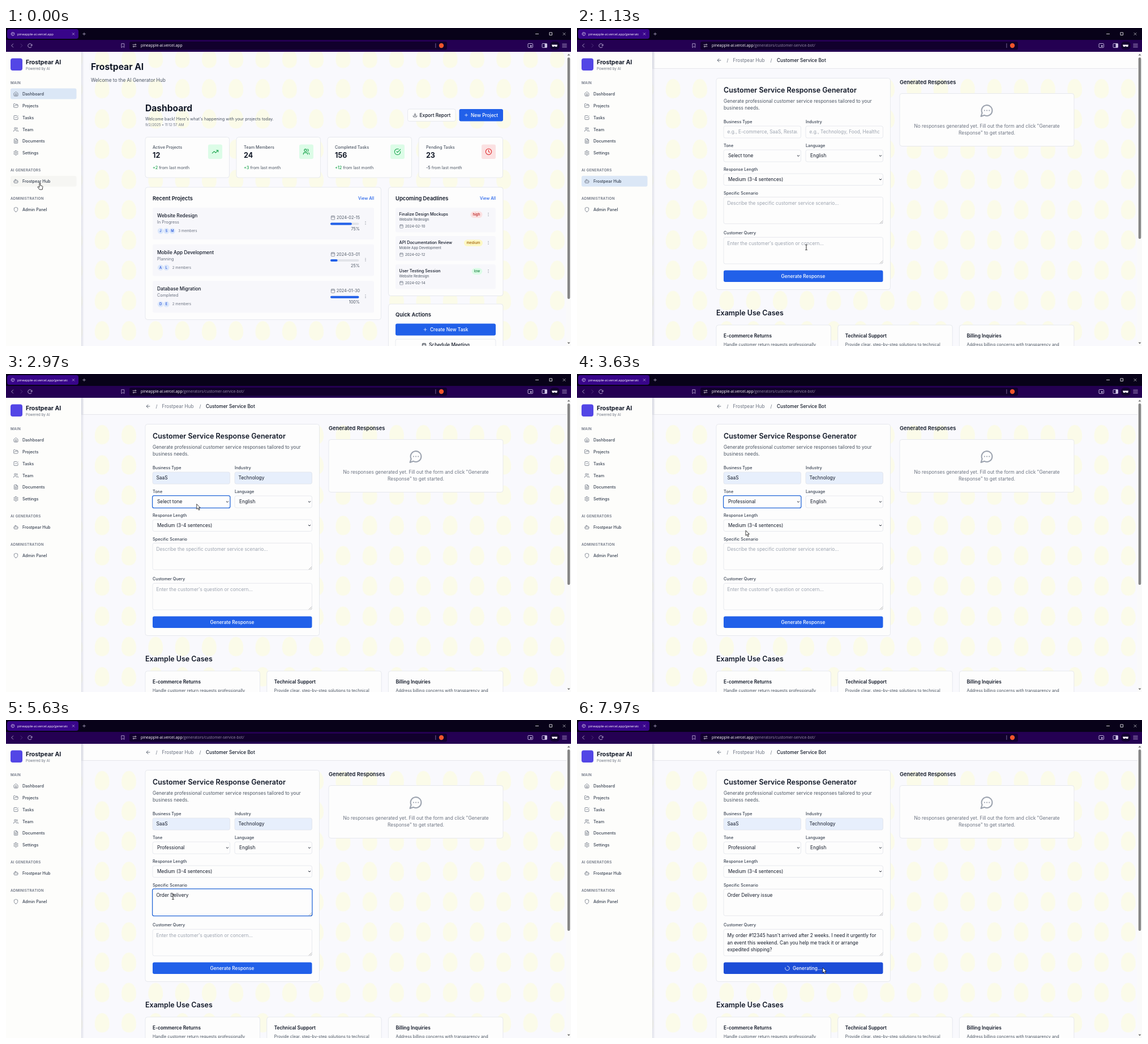
Animation, 998 px wide and 561 px high, one loop 8 s. Source, as an HTML page:

```html
<!DOCTYPE html>
<html lang="en">
<head>
<meta charset="utf-8">
<title>Response generator demo</title>
<style>
  html, body { margin: 0; width: 100%; height: 100%; overflow: hidden; background: #f9f9fd; }
  svg { display: block; width: 998px; height: 561px; font-family: Inter, "Open Sans", sans-serif; }
  text { white-space: pre; }
</style>
</head>
<body>
<svg id="stage" viewBox="0 0 998 561"></svg>
<script>
const DURATION = 8000;
const INK = '#111827', TEXT = '#4b5563', MUTED = '#6b7280', HINT = '#9ca3af';
const BLUE = '#2160e9', LINE = '#dfe1e8', CARD = '#fdfdfd';
const BASE = 8.32, SMALL = 7.28, TINY = 6.24;

const ICONS = {
  home: 'M3 10l9-7 9 7v10a2 2 0 0 1-2 2H5a2 2 0 0 1-2-2zM9 22V12h6v10',
  folder: 'M6 14l1.5-3A2 2 0 0 1 9.2 10H20a2 2 0 0 1 2 2.5l-1.5 6A2 2 0 0 1 18.5 20H4a2 2 0 0 1-2-2V5a2 2 0 0 1 2-2h4l3 3h7a2 2 0 0 1 2 2v2',
  task: 'M21 11v8a2 2 0 0 1-2 2H5a2 2 0 0 1-2-2V5a2 2 0 0 1 2-2h11M9 11l3 3L22 4',
  users: 'M16 21v-2a4 4 0 0 0-4-4H6a4 4 0 0 0-4 4v2M13 7a4 4 0 1 1-8 0a4 4 0 1 1 8 0M22 21v-2a4 4 0 0 0-3-3.9M16 3.1a4 4 0 0 1 0 7.8',
  file: 'M14 2H6a2 2 0 0 0-2 2v16a2 2 0 0 0 2 2h12a2 2 0 0 0 2-2V8zM14 2v6h6M8 13h8M8 17h8M8 9h2',
  gear: 'M10 2h4l.6 3 2 1.1 2.9-1 2 3.5-2.3 2v2.8l2.3 2-2 3.5-2.9-1-2 1.1-.6 3h-4l-.6-3-2-1.1-2.9 1-2-3.5 2.3-2v-2.8l-2.3-2 2-3.5 2.9 1 2-1.1zM15 12a3 3 0 1 1-6 0a3 3 0 1 1 6 0',
  bot: 'M12 8V4H8M6 8h12a2 2 0 0 1 2 2v8a2 2 0 0 1-2 2H6a2 2 0 0 1-2-2v-8a2 2 0 0 1 2-2M2 14h2M20 14h2M15 13v2M9 13v2',
  shield: 'M12 22c5-2 8-5 8-9V5l-8-3-8 3v8c0 4 3 7 8 9z',
  download: 'M21 15v4a2 2 0 0 1-2 2H5a2 2 0 0 1-2-2v-4M7 10l5 5 5-5M12 15V3',
  plus: 'M5 12h14M12 5v14',
  trend: 'M22 7l-8.5 8.5-5-5L2 17M16 7h6v6',
  done: 'M22 11v1a10 10 0 1 1-6-9M9 11l3 3L22 4',
  clock: 'M22 12a10 10 0 1 1-20 0a10 10 0 1 1 20 0M12 6v6l4 2',
  calendar: 'M5 4h14a2 2 0 0 1 2 2v14a2 2 0 0 1-2 2H5a2 2 0 0 1-2-2V6a2 2 0 0 1 2-2M16 2v4M8 2v4M3 10h18',
  dots: 'M12 5v.1M12 12v.1M12 19v.1',
  chat: 'M7.9 20A9 9 0 1 0 4 16.1L2 22zM8 12h.1M12 12h.1M16 12h.1',
  back: 'M12 19l-7-7 7-7M19 12H5',
  next: 'M12 19l7-7-7-7M5 12h14',
  chevronLeft: 'M15 4l-8 8 8 8', chevronRight: 'M9 4l8 8-8 8', chevronDown: 'M5 8l7 7 7-7',
  reload: 'M20 7v5h-5M20 12a8.500 8.500 0 1 0-2 6',
  bookmark: 'M6 3h12v18l-6-5-6 5z',
  globe: 'M22 12a10 10 0 1 1-20 0a10 10 0 1 1 20 0M2 12h7l3 4v6M8 3l2 5h6l4-2',
  sliders: 'M3 7h9M20 7a3 3 0 1 1-6 0a3 3 0 1 1 6 0M12 17h9M10 17a3 3 0 1 1-6 0a3 3 0 1 1 6 0',
  close: 'M5 5l14 14M19 5L5 19',
  menu: 'M2 5h20M2 12h20M2 19h20',
  spinner: 'M21 12a9 9 0 1 1-6.2-8.600'
};

// Vertical positions of text and icons are given at their centre.
const rect = (x, y, w, h, fill, rx = 0, more = '') =>
  `<rect x="${x}" y="${y}" width="${w}" height="${h}" rx="${rx}" fill="${fill}" ${more}/>`;
const text = (x, y, str, size = BASE, color = INK, weight = 400, more = '') =>
  `<text x="${x}" y="${y + size * .36}" font-size="${size}" fill="${color}" font-weight="${weight}" ${more}>${str}</text>`;
const icon = (name, x, y, size = 9, color = MUTED, width = 2) =>
  `<path d="${ICONS[name]}" transform="translate(${x - size / 2} ${y - size / 2}) scale(${size / 24})" fill="none" stroke="${color}" stroke-width="${width}" stroke-linecap="round" stroke-linejoin="round"/>`;
const box = (x, y, w, h, rx = 4, fill = CARD, more = '') =>
  rect(x, y, w, h, fill, rx, `stroke="${LINE}" stroke-width=".7" ${more}`);
const circle = (x, y, r, fill) => `<circle cx="${x}" cy="${y}" r="${r}" fill="${fill}"/>`;
const END = 'text-anchor="end"', MID = 'text-anchor="middle"';

function backdrop() {
  return `<defs>
    <pattern id="dots" width="47.3" height="53.4" x="193.300" y="80" patternUnits="userSpaceOnUse">
      <path d="M23.700 10c8 0 13 9 13 19s-5 15-13 15-13-5-13-15 5-19 13-19z" fill="#fbfbe9"/></pattern>
    <linearGradient id="edge"><stop stop-color="#c9cbd8" stop-opacity=".55"/><stop offset="1" stop-color="#c9cbd8" stop-opacity="0"/></linearGradient>
    <clipPath id="tabClip"><rect x="18" width="91" height="21"/></clipPath>
    <clipPath id="bizClip"><rect x="263" y="173" width="126" height="21"/></clipPath>
    <clipPath id="indClip"><rect x="408" y="173" width="126.500" height="21"/></clipPath>
  </defs>` + rect(0, 0, 998, 561, '#f9f9fd') + rect(133, 42, 857, 519, 'url(#dots)');
}

function browser() {
  const pale = '#cfc5e6', ui = '"Open Sans", sans-serif';
  const font = `font-family='${ui}'`;
  return rect(0, 0, 998, 21, '#080219') + rect(2, 2, 126, 17, '#38058a', 4) + rect(0, 21, 998, 21, '#240052')
    + icon('globe', 12, 10.5, 7, '#ddd5ee')
    + `<g clip-path="url(#tabClip)">${text(20, 10.500, '', 5.900, '#fff', 400, `id="tabTitle" ${font}`)}</g>`
    + icon('close', 119, 10.500, 6, '#fff') + icon('plus', 138, 10.500, 8, pale)
    + icon('chevronLeft', 11.500, 31, 9, pale) + icon('chevronRight', 27, 31, 9, '#5d4587') + icon('reload', 42.500, 31, 10, pale)
    + icon('bookmark', 206.500, 31, 9, pale)
    + rect(218, 24, 561, 14.500, '#11002c', 3) + icon('sliders', 227, 31, 8, '#fff')
    + text(238, 31, 'pineapple-ai.vercel.app<tspan id="path" fill="#9a90ad"></tspan>', 6.800, '#fff', 400, font)
    + rect(758.500, 27, .8, 8, '#8d7cab') + circle(769, 31, 4.200, '#f0552c')
    + rect(935, 10, 6, .8, '#fff') + rect(960, 8, 4.500, 4.500, 'none', 0, 'stroke="#fff" stroke-width=".8"') + icon('close', 986, 10.500, 7, '#fff')
    + rect(922, 27.500, 8.500, 7, 'none', 1, `stroke="${pale}" stroke-width=".9"`) + rect(926, 30.500, 2.500, 2.500, pale)
    + rect(947, 27.500, 8.500, 7, 'none', 1, `stroke="${pale}" stroke-width=".9"`) + rect(951.500, 27.500, 4, 7, pale)
    + rect(961, 24, 17, 14, '#13002f', 6) + `<path d="M964 29.500h10l-.7 3.500h-3.300l-.8-2-.8 2h-3.300z" fill="#fff"/>`
    + icon('menu', 986.500, 31, 9, pale);
}

function sidebar() {
  const items = [['home', 'Dashboard', 116], ['folder', 'Projects', 137], ['task', 'Tasks', 158], ['users', 'Team', 179],
    ['file', 'Documents', 199.500], ['gear', 'Settings', 220.300], ['bot', 'Frostpear Hub', 270.300], ['shield', 'Admin Panel', 320.300]];
  const caps = [['MAIN', 96.300], ['AI GENERATORS', 250.300], ['ADMINISTRATION', 300.300]];
  return rect(133, 42, 5, 519, 'url(#edge)') + rect(0, 42, 132.500, 519, '#fdfdfb')
    + rect(8, 53.500, 21, 21.500, '#5346e6', 4)
    + text(35, 60, 'Frostpear AI', 10.400, INK, 700) + text(35, 71.300, 'Powered by AI', TINY, MUTED)
    + caps.map(([s, y]) => text(8, y, s, TINY, MUTED, 600, 'letter-spacing=".3"')).join('')
    + rect(8, 106.500, 116.500, 19, '#dbe7f6', 3, 'id="navHome"') + rect(8, 260.800, 116.500, 19, '#f6f6f3', 3, 'id="navHub"')
    + items.map(([i, s, y]) => icon(i, 17.500, y, 9.400) + text(29, y, s, SMALL, '#374151', 500)).join('');
}

function dashboard() {
  const stats = [['Active Projects', '12', '+2', 'trend', '#16a34a', '#dcfce7'], ['Team Members', '24', '+3', 'users', '#16a34a', '#dcfce7'],
    ['Completed Tasks', '156', '+12', 'done', '#16a34a', '#dcfce7'], ['Pending Tasks', '23', '-5', 'clock', '#dc2626', '#fbe1e2']];
  const projects = [['Website Redesign', 'In Progress', 'JSM', '2024-02-15', 75], ['Mobile App Development', 'Planning', 'AL', '2024-03-01', 25],
    ['Database Migration', 'Completed', 'DE', '2024-01-30', 100]];
  const deadlines = [['Finalize Design Mockups', 'Website Redesign', '2024-02-10', 'high', 831, 21, '#fbe1e2', '#b91c1c'],
    ['API Documentation Review', 'Mobile App Development', '2024-02-12', 'medium', 825.500, 33, '#fdf8c4', '#a16207'],
    ['User Testing Session', 'Website Redesign', '2024-02-14', 'low', 832, 18.500, '#dcfce7', '#15803d']];

  const stat = ([label, n, diff, ic, color, tint], i) => {
    const x = 246 + i * 161;
    return box(x, 192.500, 148.500, 71.500) + text(x + 13, 210.500, label, SMALL, TEXT, 500) + text(x + 13, 224, n, 12.500, INK, 700)
      + rect(x + 111, 205.500, 25, 25.500, tint, 3) + icon(ic, x + 123.500, 218.300, 12.500, color)
      + text(x + 13, 246, `<tspan fill="${diff[0] === '+' ? '#16a34a' : TEXT}" font-weight="500">${diff}</tspan> from last month`, SMALL, TEXT);
  };
  const project = ([name, state, people, date, pct], i) => {
    const y = 317 + i * 64.600;
    return rect(259, y, 391, 56, '#f7f7fb', 3) + text(267, y + 14.300, name, BASE, INK, 500) + text(267, y + 25.500, state, SMALL, MUTED)
      + [...people].map((c, k) => circle(273 + k * 10.400, y + 41, 5.200, '#dbe7fb') + text(273 + k * 10.400, y + 41, c, 5.800, '#1d4ed8', 500, MID)).join('')
      + text(273 + people.length * 10.400, y + 41, people.length + ' members', TINY, MUTED)
      + icon('calendar', 577.500, y + 17.500, 8.300, MUTED) + text(625, y + 17.500, date, SMALL, TEXT, 400, END)
      + rect(573, y + 26.500, 50.500, 4, '#e2e4e9', 2) + rect(573, y + 26.500, 50.500 * pct / 100, 4, BLUE, 2)
      + text(625, y + 37.300, pct + '%', SMALL, TEXT, 400, END) + icon('dots', 635, y + 27, 8.300, TEXT, 3);
  };
  const deadline = ([name, group, date, level, cx, w, tint, color], i) => {
    const y = 317 + i * 50;
    return rect(688, y, 177, 43.500, '#f7f7fb', 3) + text(694.500, y + 11, name, SMALL, INK, 500) + text(694.500, y + 20.300, group, TINY, TEXT)
      + icon('calendar', 698.500, y + 32.800, 7.500) + text(705, y + 32.800, date, TINY, TEXT)
      + rect(cx - w / 2, y + 6.500, w, 11.500, tint, 5.700) + text(cx, y + 12, level, TINY, color, 500, MID) + icon('dots', 852, y + 12, 8.300, TEXT, 3);
  };
  return text(150, 68.500, 'Frostpear AI', 15.600, INK, 700) + text(150, 92.300, 'Welcome to the AI Generator Hub', BASE, TEXT)
    + text(246, 141.500, 'Dashboard', 15.600, INK, 700)
    + text(246, 160, "Welcome back! Here's what's happening with your projects today.", SMALL, TEXT)
    + text(246, 171, '9/2/2025 • 11:12:57 AM', TINY, MUTED)
    + box(709.500, 143, 84.500, 21.500, 3) + icon('download', 722.500, 153.700, 8.300, INK) + text(730.500, 153.700, 'Export Report', BASE, INK, 500)
    + rect(800.500, 143, 77.500, 21.500, BLUE, 3) + icon('plus', 813, 153.700, 8.300, '#fff') + text(821, 153.700, 'New Project', BASE, '#fff', 500)
    + stats.map(stat).join('')
    + box(246, 281, 416.500, 233.500) + text(259, 300.700, 'Recent Projects', 9.360, INK, 600) + text(650, 300.700, 'View All', SMALL, BLUE, 500, END)
    + projects.map(project).join('')
    + box(675.500, 281, 202.500, 191.500) + text(688, 300.700, 'Upcoming Deadlines', 9.360, INK, 600) + text(865, 300.700, 'View All', SMALL, BLUE, 500, END)
    + deadlines.map(deadline).join('')
    + box(675.500, 487, 202.500, 100) + text(688, 505.700, 'Quick Actions', 9.360, INK, 600)
    + rect(688, 521.500, 177, 21, BLUE, 3) + icon('plus', 740.500, 532, 8.300, '#fff') + text(749, 532, 'Create New Task', BASE, '#fff', 500)
    + box(688, 549, 177, 21, 3) + icon('calendar', 738.500, 559.500, 8.300, INK) + text(747, 559.500, 'Schedule Meeting', BASE, INK, 500);
}

const FIELDS = {
  biz: [259, 173, 136.500, 21], ind: [404, 173, 136.500, 21], tone: [259, 215, 136.500, 21],
  scenario: [259, 298.300, 281.500, 47], query: [259, 369.300, 281.500, 46.700]
};

function generator() {
  const field = id => box(...FIELDS[id], 3, CARD, `id="${id}Box"`);
  const label = (x, y, s) => text(x, y, s, SMALL, '#374151', 500);
  const arrow = (x, y) => icon('chevronDown', x, y, 6, INK, 4);
  const grip = y => `<path d="M540 ${y}l-5 5M540 ${y + 3}l-2 2" stroke="#777" stroke-width=".6"/>`;
  const cases = [['E-commerce Returns', 'Handle customer return requests professionally'],
    ['Technical Support', 'Provide clear, step-by-step solutions to technical'], ['Billing Inquiries', 'Address billing concerns with transparency and']];
  return rect(133, 42, 857, 29, '#fdfdfd') + rect(133, 71, 857, .8, '#e1e2e8') + rect(133, 42, 5, 29, 'url(#edge)')
    + icon('back', 251, 57, 10, TEXT) + text(264.500, 57, '/', BASE, MUTED) + text(275.500, 57, 'Frostpear Hub', BASE, MUTED)
    + text(341.500, 57, '/', BASE, MUTED) + text(353, 57, 'Customer Service Bot', BASE, INK, 500)
    + box(246, 88.500, 307.500, 373) + text(259, 109.700, 'Customer Service Response Generator', 12.500, INK, 600)
    + text(259, 128.700, 'Generate professional customer service responses tailored to your', BASE, TEXT) + text(259, 141.200, 'business needs.', BASE, TEXT)
    + label(259, 165, 'Business Type') + label(404, 165, 'Industry') + label(259, 207.700, 'Tone') + label(404, 207.700, 'Language')
    + label(259, 249.500, 'Response Length') + label(259, 291, 'Specific Scenario') + label(259, 361.800, 'Customer Query')
    + Object.keys(FIELDS).map(field).join('')
    + box(404, 215, 136.500, 21, 3) + box(259, 257, 281.500, 20.500, 3)
    + `<g clip-path="url(#bizClip)">${text(265.500, 183.500, '', BASE, INK, 400, 'id="bizText"')}</g>`
    + `<g clip-path="url(#indClip)">${text(410.500, 183.500, '', BASE, INK, 400, 'id="indText"')}</g>`
    + text(267, 225.500, '', BASE, INK, 400, 'id="toneText"') + text(412, 225.500, 'English') + text(267, 267.300, 'Medium (3-4 sentences)')
    + arrow(391, 225.700) + arrow(536, 225.700) + arrow(536, 267.300)
    + text(265.500, 309.500, '', BASE, INK, 400, 'id="scenarioText"')
    + [0, 1, 2].map(i => text(265.500, 380.200 + i * 12.500, '', BASE, INK, 400, `id="queryText${i}"`)).join('')
    + grip(340) + grip(410.500)
    + rect(0, 0, .8, 10, INK, 0, 'id="caret"')
    + rect(259, 427.500, 281.500, 20.500, BLUE, 3, 'id="button"')
    + `<g id="idle">${text(399.500, 438, 'Generate Response', BASE, '#fff', 500, MID)}</g>`
    + `<g id="busy"><g id="spin">${icon('spinner', 371.500, 438, 10, '#fff')}</g>${text(381, 438, 'Generating...', BASE, '#fff', 500)}</g>`
    + text(570, 95.700, 'Generated Responses', 9.360, INK, 600) + box(570, 115.500, 308, 93) + icon('chat', 724, 145.500, 25, HINT)
    + text(724, 172.700, 'No responses generated yet. Fill out the form and click "Generate', BASE, MUTED, 400, MID)
    + text(724, 185.200, 'Response" to get started.', BASE, MUTED, 400, MID)
    + text(246, 502.700, 'Example Use Cases', 12.500, INK, 600)
    + cases.map(([title, line], i) => box(246 + i * 214.700, 524, 202.500, 60)
      + text(259 + i * 214.700, 543, title, BASE, INK, 600) + text(259 + i * 214.700, 558.500, line, SMALL, TEXT)).join('');
}

function scrollbar() {
  return rect(990, 42, 8, 519, '#fafafa') + rect(991.700, 52, 4.600, 426, '#858585', 2.300, 'id="thumb"')
    + '<path d="M991.500 48.500l2.500-3 2.500 3zM991.500 554.500l2.500 3 2.500-3z" fill="#777"/>';
}

function pointer() {
  return `<g id="pointer">
    <path id="arrow" d="M0 0v9l2-1.900 1.700 3.600 1.600-.7-1.700-3.500h2.800z" fill="#fff" stroke="#111" stroke-width=".8"/>
    <path id="hand" d="M-1 0c0-1.300 1.800-1.300 1.800 0v4l3.200.8c.8.300 1 .8.900 1.600l-.7 4.600h-5l-3-4c-.5-1 .5-1.700 1.300-1l1.500 1.200z" fill="#fff" stroke="#111" stroke-width=".8"/>
    <path id="beam" d="M-1.800-4.500h1.300l.5.500.5-.5h1.300M0-4v8M-1.800 4.500h1.300L0 4l.5.500h1.300" fill="none" stroke="#111" stroke-width=".9"/></g>`;
}

document.getElementById('stage').innerHTML = backdrop() + `<g id="dash">${dashboard()}</g><g id="form">${generator()}</g>`
  + sidebar() + scrollbar() + browser() + pointer();

const $ = Object.fromEntries([...document.querySelectorAll('[id]')].map(e => [e.id, e]));
const show = (el, on) => el.setAttribute('display', on ? 'inline' : 'none');
const set = (el, attrs) => Object.entries(attrs).forEach(([k, v]) => el.setAttribute(k, v));
const put = (el, str) => { if (el.textContent !== str) el.textContent = str; };
const at = (steps, t) => steps.filter(s => s[0] <= t).pop();

const OPEN_FORM = 620, BUSY = 7720;
const FOCUS = [[0, ''], [1500, 'biz'], [2430, 'ind'], [2920, 'tone'], [3900, ''], [4130, 'scenario'], [6480, 'query'], [7640, '']];
const BIZ = [[0, ''], [1700, 'S'], [1800, 'Sa'], [2020, 'SaaS']];
const IND = [[0, ''], [2580, 'T'], [2660, 'Te'], [2800, 'Technology']];
const QUERY = ["My order #12345 hasn't arrived after 2 weeks. I need it urgently for",
  'an event this weekend. Can you help me track it or arrange', 'expedited shipping?'];
const POINTER = [[0, 60, 274, 'hand'], [300, 60, 274, 'arrow'], [900, 405, 387, 'beam'], [1180, 405, 387, 'beam'], [1480, 345, 185, 'beam'],
  [1850, 345, 185, 'arrow'], [2050, 390, 196, 'arrow'], [2290, 390, 196, 'arrow'], [2420, 470, 185, 'beam'], [2640, 455, 195, 'arrow'],
  [2900, 340, 226, 'arrow'], [3250, 310, 258, 'arrow'], [3560, 298, 276, 'arrow'], [3700, 298, 276, 'arrow'], [3950, 295, 312, 'beam'],
  [6220, 295, 312, 'beam'], [6450, 390, 391, 'beam'], [7150, 390, 391, 'arrow'], [7550, 434, 437, 'arrow'], [DURATION, 434, 437, 'arrow']];

function movePointer(t) {
  const i = POINTER.findIndex(p => p[0] > t) - 1;
  const [t0, x0, y0, kind] = POINTER[i], [t1, x1, y1] = POINTER[i + 1];
  const u = (t - t0) / (t1 - t0), k = u * u * (3 - 2 * u);
  set($.pointer, { transform: `translate(${x0 + (x1 - x0) * k} ${y0 + (y1 - y0) * k})` });
  ['arrow', 'hand', 'beam'].forEach(id => show($[id], id === kind));
}

function fill(el, value, hint) {
  put(el, value || hint);
  el.setAttribute('fill', value ? INK : HINT);
}

function render(t) {
  const onForm = t >= OPEN_FORM, focus = at(FOCUS, t)[1], busy = t >= BUSY;
  show($.dash, !onForm);
  show($.form, onForm);
  show($.navHome, t < 300);
  show($.navHub, t < 1250);
  $.navHub.setAttribute('fill', t < 300 ? '#f6f6f3' : '#dbe7f6');
  $.thumb.setAttribute('height', onForm ? 320 : 426);
  put($.path, onForm ? '/generators/customer-service-bot/' : '');
  put($.tabTitle, 'pineapple-ai.vercel.app' + (onForm ? '/generators/' : ''));

  const typed = 'Order Delivery issue'.slice(0, Math.max(0, Math.floor((t - 4290) / 93)));
  fill($.bizText, at(BIZ, t)[1], 'e.g., E-commerce, SaaS, Restaurant');
  fill($.indText, at(IND, t)[1], 'e.g., Technology, Food, Healthcare');
  put($.toneText, t < 3250 ? 'Select tone' : 'Professional');
  fill($.scenarioText, typed, 'Describe the specific customer service scenario...');
  const pasted = t >= 6900;
  QUERY.forEach((line, i) => fill($['queryText' + i], pasted ? line : '', i ? '' : "Enter the customer's question or concern..."));

  for (const [id, [x, y, w, h]] of Object.entries(FIELDS)) {
    const on = id === focus, grow = on ? .4 : 0;
    const auto = (id === 'biz' && t >= 2020) || (id === 'ind' && t >= 2800);
    set($[id + 'Box'], { x: x - grow, y: y - grow, width: w + 2 * grow, height: h + 2 * grow,
      stroke: on ? '#2467d8' : LINE, 'stroke-width': on ? 1.300 : .7, fill: auto ? '#e7effc' : CARD });
  }

  const holder = { biz: $.bizText, ind: $.indText, scenario: $.scenarioText, query: pasted ? $.queryText2 : $.queryText0 }[focus];
  show($.caret, holder && t % 340 >= 200);
  if (holder) {
    const empty = holder.getAttribute('fill') === HINT;
    set($.caret, { x: +holder.getAttribute('x') + (empty ? 0 : holder.getComputedTextLength()), y: holder.getAttribute('y') - 8 });
  }

  $.button.setAttribute('fill', t >= 7480 ? '#1c4dd7' : BLUE);
  show($.idle, !busy);
  show($.busy, busy);
  $.spin.setAttribute('transform', `rotate(${(t - 7970) * 1.400 - 90} 371.5 438)`);
  movePointer(t);
}

const start = performance.now();
function tick() {
  render((performance.now() - start) % DURATION);
  requestAnimationFrame(tick);
}
tick();
</script>
</body>
</html>
```
